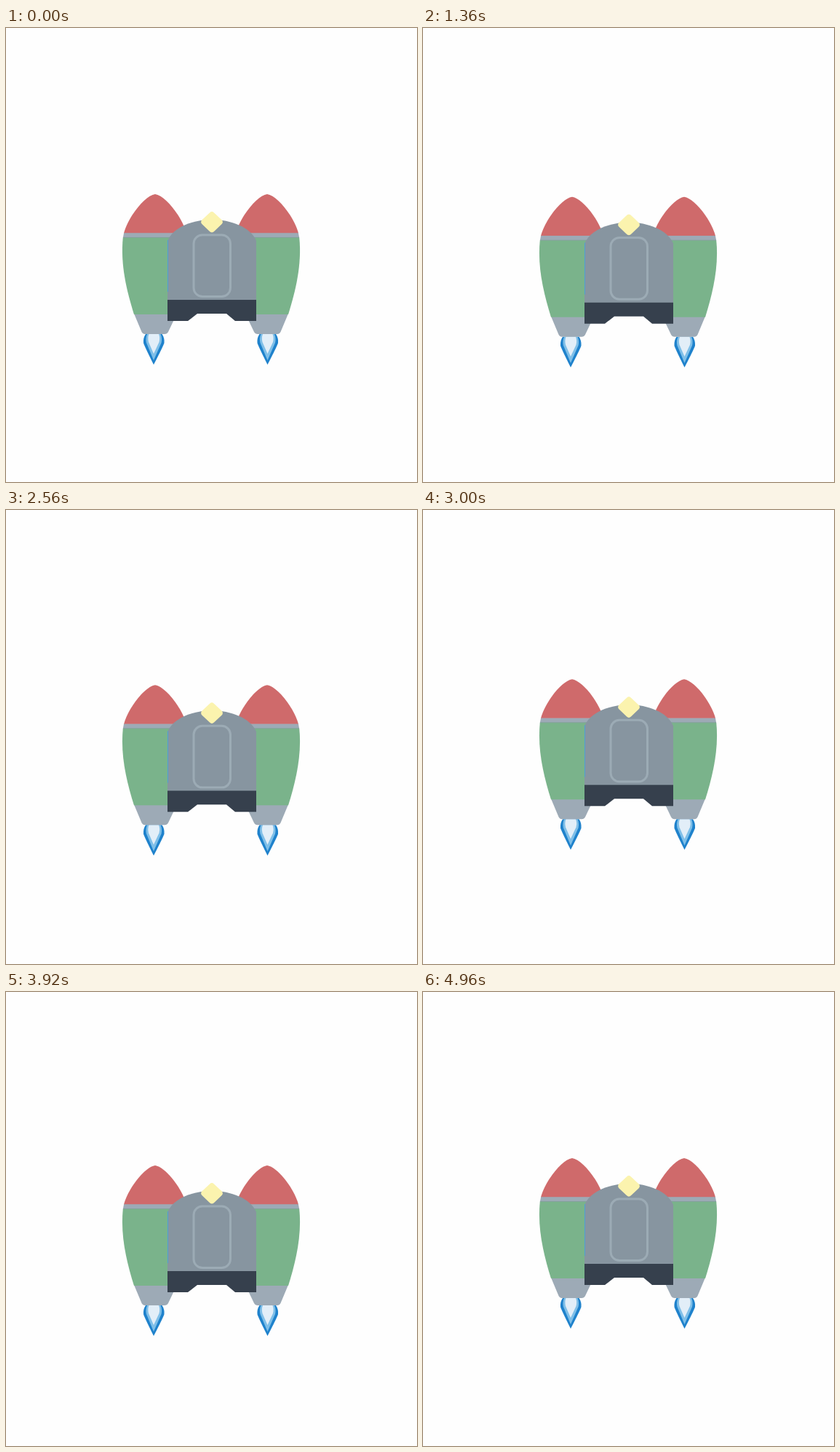
An HTML page that plays this animation: 565x623 px, repeating every 5000 ms.

```html
<!DOCTYPE html>
<html>
<head>
<meta charset="utf-8">
<style>
  html, body { margin: 0; height: 100%; overflow: hidden; background: #fefefe; }
  svg { display: block; }
</style>
</head>
<body>
<svg width="565" height="623" viewBox="0 0 565 623">
  <defs>
    <g id="booster">
      <path fill="#9daab6" d="M162 281H248V394H234L223 417Q221.500 420 218 420H191Q188 420 186.500 417L176 392Z"/>
      <path fill="#cf6a6b" d="M162 281.500C168 259 191 230 205 228C219 230 242 259 248 281.500Z"/>
      <path fill="#9daab6" d="M162 281.500H248V288H160.800Z"/>
      <path fill="#7ab38b" d="M160.800 287.500H248V393H176C166 361 157 325 160.800 287.500Z"/>
      <path fill="none" stroke="#84a29b" d="M161 287.500H248"/>
    </g>
    <g id="flame">
      <path fill="#1f82cc" d="M192 420H214.500Q218 425 217.500 432Q217 435 203 462Q189.500 435 189 432Q188.500 425 192 420Z"/>
      <path fill="#7fbfe8" d="M194 420H212.500Q215 426 213.500 432L203 456L193 432Q191.500 426 194 420Z"/>
      <path fill="#e2eef8" d="M196.500 420H210Q212 425 210.500 431L203 447L196 431Q194.500 425 196.500 420Z"/>
    </g>
  </defs>
  <g id="jetpack">
    <use href="#flame"/>
    <use href="#flame" x="156.500"/>
    <use href="#booster"/>
    <use href="#booster" transform="matrix(-1 0 0 1 564 0)"/>
    <path fill="#8795a0" d="M222 374V292C230 273 257 263 283 263S336 273 344 292V374Z"/>
    <path stroke="#4f9fd6" d="M222.500 291V362"/>
    <path fill="#36404d" d="M222 373H344V402H315L303 392H263L250 402H222Z"/>
    <rect x="258" y="284" width="50.500" height="84.500" rx="12" fill="none" stroke="#9cabb5" stroke-width="3"/>
    <rect x="-11.300" y="-11.300" width="22.600" height="22.600" rx="4" fill="#fbf3ae" transform="translate(283 266.300) scale(1.040 .98) rotate(45)"/>
  </g>
</svg>
<script>
  const jetpack = document.getElementById('jetpack');
  const PERIOD = 5000 / 3, TRAVEL = 12.5;

  function draw() {
    const phase = performance.now() / PERIOD * 2 * Math.PI;
    const y = TRAVEL * (1 - Math.cos(phase)) / 2;
    jetpack.setAttribute('transform', `translate(0 ${y.toFixed(2)})`);
    requestAnimationFrame(draw);
  }
  draw();
</script>
</body>
</html>
```
